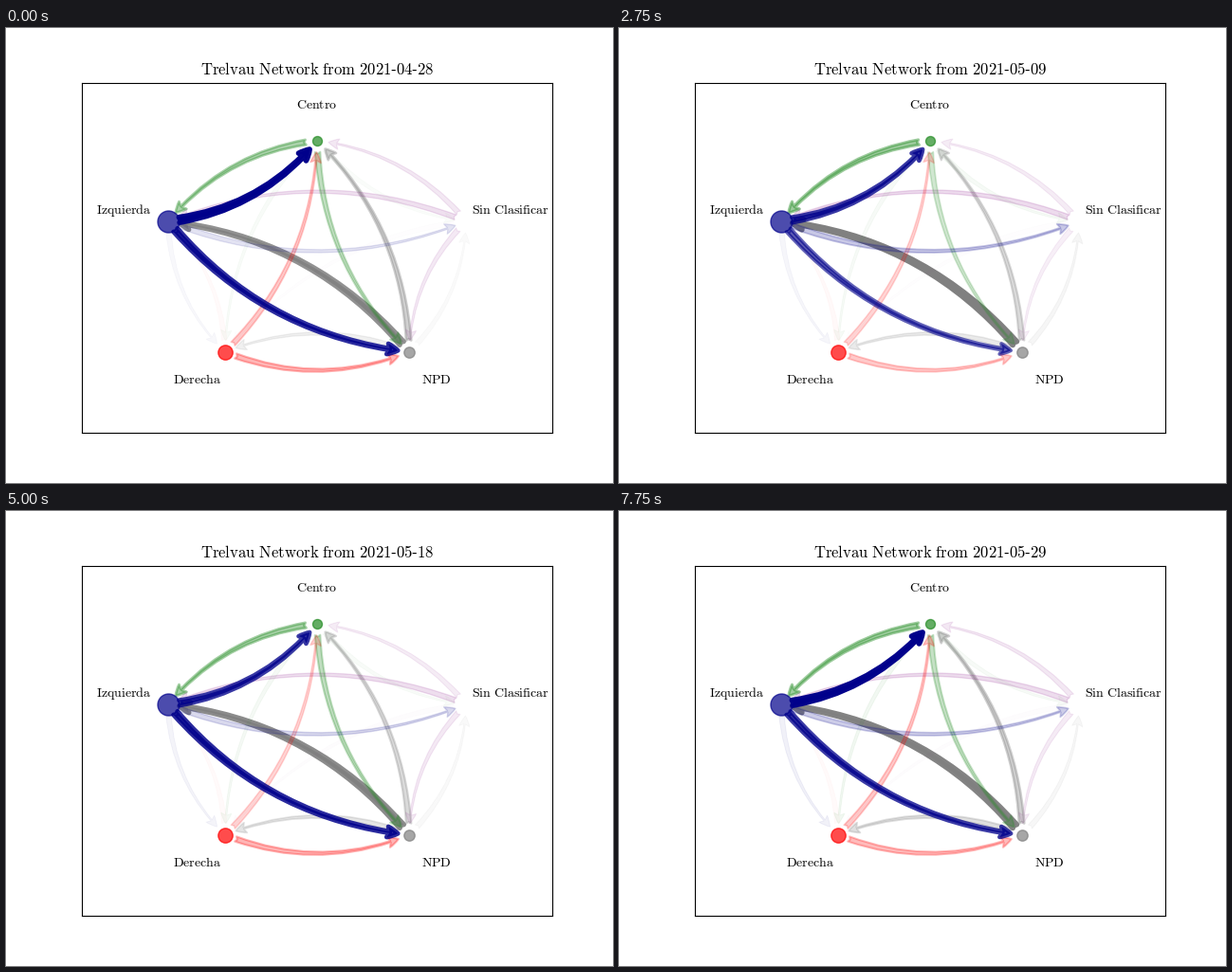
A matplotlib script that plays this animation: 640 px wide and 480 px high, repeating every 8000 ms.

```python
import math

import matplotlib.pyplot as plt
from matplotlib.animation import FuncAnimation
from matplotlib.patches import FancyArrowPatch

plt.rcParams["mathtext.fontset"] = "cm"

FRAMES, INTERVAL = 32, 250
CENTER, RADII = (328, 242.1), (165.2, 123.2)
FIRST_SUNDAY = 4

# Name: (colour, radius in px), clockwise from the right
NODES = {
    "Sin Clasificar": ("purple", 0),
    "Centro": ("forestgreen", 5),
    "Izquierda": ("darkblue", 11.5),
    "Derecha": ("red", 7.7),
    "NPD": ("gray", 5.7),
}

# Mean strength of the links that leave each node
LINKS = {
    "NPD": {"Izquierda": .93, "Centro": .32, "Derecha": .18,
            "Sin Clasificar": .05},
    "Sin Clasificar": {"Centro": .08, "Izquierda": .13, "NPD": .08,
                       "Derecha": .01},
    "Centro": {"Izquierda": .41, "NPD": .26, "Derecha": .04,
               "Sin Clasificar": .03},
    "Derecha": {"Centro": .18, "NPD": .27, "Izquierda": .02},
    "Izquierda": {"Sin Clasificar": .16, "Derecha": .04, "Centro": .86,
                  "NPD": .78},
}

# How links to each node swell: week peaks on Sundays, month at both ends
# of the loop, and trend climbs from -1 to 1
RHYTHM = {
    "Izquierda": lambda week, month, trend: 0.08 * week,
    "NPD": lambda week, month, trend: 0.1 * trend - 0.18 * week,
    "Centro": lambda week, month, trend: 0.15 * month,
    "Derecha": lambda week, month, trend: 0.35 * trend,
    "Sin Clasificar": lambda week, month, trend: 0.35 * week,
}


def roman(text):
    """Set text in the upright Computer Modern of mathtext."""
    text = text.replace(" ", r"\ ").replace("-", "\u2010")
    return rf"$\mathrm{{{text}}}$"


def place(name, scale=1):
    angle = math.radians(18 + 72 * list(NODES).index(name))
    return (CENTER[0] + scale * RADII[0] * math.cos(angle),
            CENTER[1] - scale * RADII[1] * math.sin(angle))


def date(day):
    return f"2021-04-{28 + day}" if day < 3 else f"2021-05-{day - 2:02d}"


def strength(mean, end, day):
    phase = day / (FRAMES - 1)
    week = math.cos(math.tau * (day - FIRST_SUNDAY) / 7)
    month = math.cos(math.tau * phase)
    return min(1, mean * (1 + RHYTHM[end](week, month, 2 * phase - 1)))


fig = plt.figure(figsize=(6.4, 4.8), dpi=100, facecolor="white")
ax = fig.add_axes([0.125, 0.11, 0.775, 0.77])
ax.set(xlim=(80, 576), ylim=(427.2, 57.6), xticks=[], yticks=[])
title = ax.set_title("", fontsize=12)

arrows = []
for start, ends in LINKS.items():
    for end, mean in ends.items():
        arrow = ax.add_patch(FancyArrowPatch(
            place(start), place(end), color=NODES[start][0],
            arrowstyle="fancy,head_length=0.8,head_width=0.8,tail_width=0.4",
            connectionstyle="arc3,rad=0.2", mutation_scale=10,
            shrinkA=8.66, shrinkB=8.66, zorder=1))
        arrows.append((arrow, mean, end))

for name, (color, radius) in NODES.items():
    if radius:
        ax.scatter(*place(name), s=(2 * radius * 0.72) ** 2, c=color,
                   alpha=0.7, linewidths=1, edgecolors=color, zorder=2)
    x, y = place(name, 1.3)
    ax.text(x, y + 3.1, roman(name), fontsize=10, ha="center",
            va="baseline", zorder=3)


def update(day):
    title.set_text(roman(f"Trelvau Network from {date(day)}"))
    for arrow, mean, end in arrows:
        power = strength(mean, end, day)
        arrow.set_alpha(power)
        arrow.set_linewidth(0.5 + 3.6 * power)
    return [title, *(arrow for arrow, _, _ in arrows)]


anim = FuncAnimation(fig, update, frames=FRAMES, interval=INTERVAL,
                     repeat=True, repeat_delay=0, blit=False)
plt.show()
```
